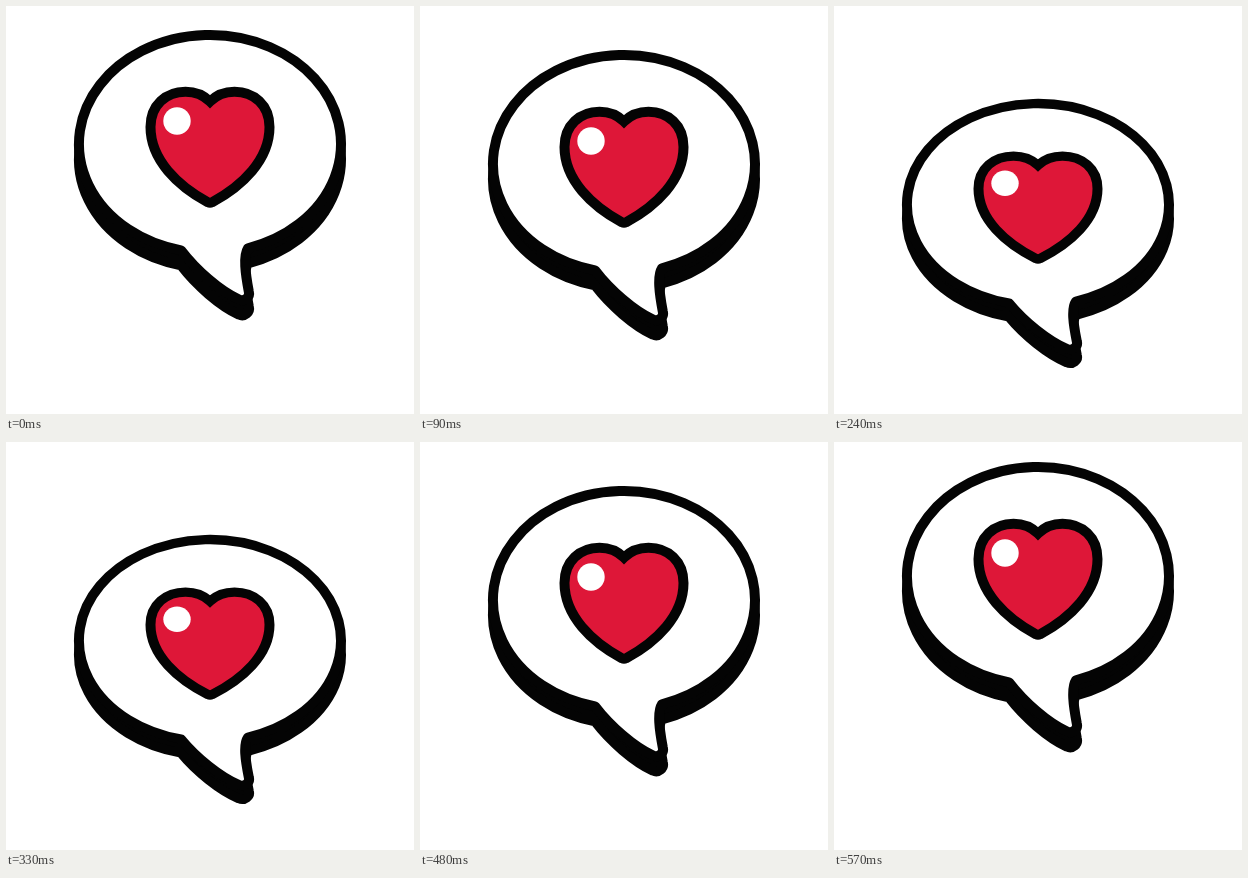
An HTML page for the animation above (620 ms loop, 408 by 408 pixels).

```html
<!DOCTYPE html>
<html lang="en">
<head>
<meta charset="utf-8">
<title>Bouncing heart bubble</title>
<style>
  html, body { margin: 0; width: 100%; height: 100%; overflow: hidden; background: #fff; }
  svg { display: block; width: 100vw; height: 100vh; }
  path { stroke: #040404; stroke-width: 10; }
</style>
</head>
<body>
<svg viewBox="0 0 408 408">
  <defs>
    <path id="outline" stroke-linejoin="round"
      d="M175 244.3 A131 109 0 1 1 242 242.3 C237 250 239.5 268 242.8 285.5
         A7 7 0 0 1 233 293.6 C214 285 190 264 175 244.3 Z"/>
  </defs>
  <g id="bubble">
    <use href="#outline" y="15" fill="#040404"/>
    <use href="#outline" fill="#fff"/>
    <path fill="#de1738" stroke-linejoin="miter"
      d="M204 95.5 C197 88.5 188 85.7 179.5 85.7 C160 85.7 144.5 99 144.5 121
         C144.5 154 172 180 202 196.3 Q204 197.2 206 196.3
         C236 180 263.5 154 263.5 121 C263.5 99 248 85.7 228.5 85.7
         C220 85.7 211 88.5 204 95.5 Z"/>
    <circle cx="171" cy="115" r="13.7" fill="#fff"/>
  </g>
</svg>
<script>
  const LOOP = 620, STEP = 30, LAST = 19;
  const FOOT = 314;      // lowest point of the bubble at rest
  const FALL = 20 / 3;   // drop per step
  const LANDED = 47.7;   // drop when the foot touches the ground
  const SQUASH = { 8: 0.927, 9: 0.9 };
  const bubble = document.getElementById("bubble");

  // The way up mirrors the way down, with a small overshoot at the top.
  function pose(step) {
    if (step === LAST) return { drop: -4, scale: 1 };
    const k = Math.min(step, LAST - step);
    return { drop: Math.min(k * FALL, LANDED), scale: SQUASH[k] || 1 };
  }

  function draw(now) {
    const step = Math.min(LAST, Math.floor((now % LOOP) / STEP));
    const { drop, scale } = pose(step);
    bubble.setAttribute("transform",
      `translate(0 ${FOOT + drop}) scale(1 ${scale}) translate(0 ${-FOOT})`);
  }

  const start = performance.now();
  function tick() {
    draw(performance.now() - start);
    requestAnimationFrame(tick);
  }
  tick();
</script>
</body>
</html>
```
